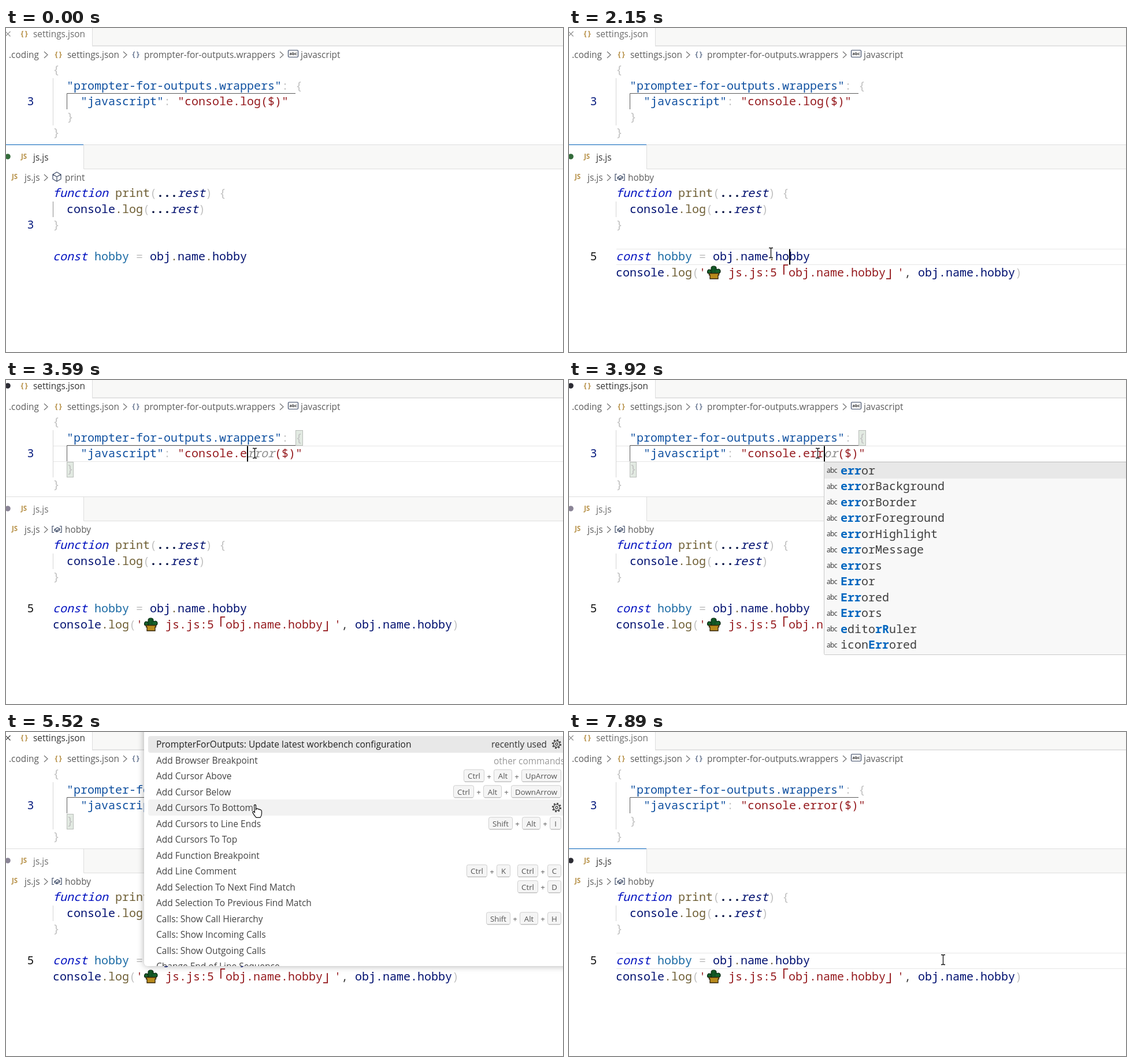
An HTML page for the animation above (8 s loop, 964 px wide and 562 px high).

```html
<!DOCTYPE html>
<html lang="en">
<head>
<meta charset="utf-8">
<title>Editor</title>
<style>
  html, body { margin: 0; width: 100%; height: 100%; overflow: hidden; background: #fff; }
  svg { display: block; }
  text { white-space: pre; }
  .code { font: 20px "Noto Sans Mono", monospace; }
  .ui { font: 15.4px "Open Sans", sans-serif; fill: #5c5c5c; }
  .js { font: bold 11.5px "Open Sans", sans-serif; fill: #b8924a; }
  .abc { font: 12px "Open Sans", sans-serif; fill: #333; }
  .cjk { font: 300 26px "Noto Sans CJK JP", "Noto Sans CJK", sans-serif; }
  .chip { font: 13.3px "Open Sans", sans-serif; fill: #555; text-anchor: middle; }
  .brace { font: bold 13px "Noto Sans Mono", monospace; }
  .b { fill: #c2c2c2; }
  .kw { fill: #0010c0; font-style: italic; }
  .var { fill: #001070; }
  .arg { fill: #001070; font-style: italic; }
  .dots { fill: #001040; font-weight: bold; }
  .con { fill: #1a6aa4; }
  .fn { fill: #6f5f35; }
  .key { fill: #0f50a0; }
  .str { fill: #951a1e; }
  .num { fill: #0b1f80; }
  .ghost { fill: #8f8f8f; font-style: italic; }
  .hit { fill: #0066bf; font-weight: bold; }
  .item { fill: #3f3f3f; }
  .line { fill: none; stroke: #e6e6e6; }
  .icon { fill: none; stroke: #3c4a66; stroke-width: 1.2; }
  .match { fill: #e2eae2; stroke: #b9bdb9; }
</style>
</head>
<body>
<svg id="stage" width="964" height="562" viewBox="0 0 964 562"></svg>
<script>
const LOOP = 8000;
const STEP = 67;
const WORD = 'error';
const CH = 12;

const text = (x, y, cls, s, more = '') => `<text x="${x}" y="${y}" class="${cls}" ${more}>${s}</text>`;
const span = (cls, s) => `<tspan class="${cls}">${s}</tspan>`;
const rect = (x, y, w, h, more) => `<rect x="${x}" y="${y}" width="${w}" height="${h}" ${more}/>`;
const path = (d, more) => `<path d="${d}" ${more}/>`;
const group = (id, ...parts) => `<g id="${id}">${parts.join('')}</g>`;
// A code row made of class, text, class, text ...
const row = (x, y, ...parts) => {
  let out = '';
  for (let i = 0; i < parts.length; i += 2) out += span(parts[i], parts[i + 1]);
  return text(x - 1, y, 'code', out);
};
const chevron = (x, y) => path(`M${x} ${y - 5}l6 5.5l-6 5.5`, 'fill="none" stroke="#707070" stroke-width="1.2"');
const braces = (x, y, more) => text(x, y, 'brace', '{', more) + text(x + 7.5, y, 'brace', '}', more);
const lineBox = y => path(`M82 ${y}.5H964M82 ${y + 27}.5H964`, 'class="line"');

const cactus =
  path('M246 426v-9q0-4 4.500-4t4.500 4v2l4-1q3 1 3 4t-3 4zM246 420l-4-1q-2.500 1-2.500 4t3 3h4z', 'fill="#14602a" stroke="#08240f" stroke-width="1.2"') +
  path('M249 415v9M252.500 415v9', 'stroke="#0a3a16"') +
  path('M242.500 425.500h17v3h-1.500v6.500h-14v-6.500h-1.500z', 'fill="#b88a1c" stroke="#33240a" stroke-width="1.3"');

function gear(y) {
  return `<g fill="none" stroke="#444" transform="translate(953 ${y})">
    <circle r="7" stroke-width="2.4" stroke-dasharray="2.75"/>
    <circle r="5.4" stroke-width="1.3"/><circle r="2" stroke-width="1.3"/></g>`;
}

const CHIP = { Ctrl: 36, Alt: 32, Shift: 42, UpArrow: 69, DownArrow: 87, I: 20 };

// Key caps, laid out from the right edge
function keys(combo, y) {
  let x = 961, out = '';
  combo.split(' ').reverse().forEach((chord, i) => {
    if (i) x -= 12;
    chord.split('+').reverse().forEach((key, j) => {
      if (j) {
        out += text(x - 8, y + 5, 'chip', '+');
        x -= 16;
      }
      const w = CHIP[key] || 24;
      x -= w;
      out += rect(x + .5, y - 11.5, w - 1, 21, 'rx="3" fill="#f5f5f5" stroke="#cfcfcf"') +
        path(`M${x + 2} ${y + 9.5}h${w - 4}`, 'stroke="#b5b5b5"') +
        text(x + w / 2, y + 4.5, 'chip', key);
    });
  });
  return out;
}

const COMMANDS = [
  ['PrompterForOutputs: Update latest workbench configuration'],
  ['Add Browser Breakpoint'],
  ['Add Cursor Above', 'Ctrl+Alt+UpArrow'],
  ['Add Cursor Below', 'Ctrl+Alt+DownArrow'],
  ['Add Cursors To Bottom'],
  ['Add Cursors to Line Ends', 'Shift+Alt+I'],
  ['Add Cursors To Top'],
  ['Add Function Breakpoint'],
  ['Add Line Comment', 'Ctrl+K Ctrl+C'],
  ['Add Selection To Next Find Match', 'Ctrl+D'],
  ['Add Selection To Previous Find Match'],
  ['Calls: Show Call Hierarchy', 'Shift+Alt+H'],
  ['Calls: Show Incoming Calls'],
  ['Calls: Show Outgoing Calls'],
  ['Change End of Line Sequence']
];

function palette() {
  const rows = COMMANDS.map(([name, combo], i) => {
    const y = 21.8 + 27.5 * i;
    return text(260, y + 5.3, 'ui', name, `style="font-size:15.5px;fill:${i ? '#444' : '#222'}"`) +
      (combo ? keys(combo, y) : '');
  });
  return rect(239, -10, 740, 416, 'rx="6" fill="#fff" style="filter:drop-shadow(0 0 6px rgba(0,0,0,.32))"') +
    '<svg x="239" y="0" width="725" height="406" viewBox="239 0 725 406">' +
    rect(246, 7, 730, 29, 'rx="4" fill="#e8e8e8"') +
    rect(246, 117, 730, 28, 'rx="4" fill="#f2f2f2"') + rows.join('') +
    text(936, 27, 'ui', 'recently used', 'text-anchor="end" style="fill:#333"') +
    text(844, 55.5, 'ui', 'other commands', 'style="fill:#999"') +
    gear(21) + gear(131) + '</svg>';
}

const WORDS = ['error', 'errorBackground', 'errorBorder', 'errorForeground', 'errorHighlight', 'errorMessage',
  'errors', 'Error', 'Errored', 'Errors', 'editorRuler', 'iconErrored', 'showErrors'];

// Marks the typed letters in a word, or returns null when they do not fit
function mark(word, typed) {
  const low = word.toLowerCase();
  const hits = new Set();
  let from = Math.max(low.indexOf(typed), 0);
  for (const c of typed) {
    const k = low.indexOf(c, from);
    if (k < 0) return null;
    hits.add(k);
    from = k + 1;
  }
  return [...word].map((c, i) => span(hits.has(i) ? 'hit' : 'item', c)).join('');
}

function suggestions(n) {
  const x = 405 + CH * n;
  const list = WORDS.map(w => mark(w, WORD.slice(0, n))).filter(Boolean).slice(0, 12);
  return rect(x + .5, 142.5, 700, 334, 'rx="2" fill="#f8f8f8" stroke="#c8c8c8"') +
    rect(x + 1, 143, 700, 28, 'fill="#e8e8e8"') +
    list.map((w, i) => text(x + 5, 161 + 27.5 * i, 'abc', 'abc', 'style="letter-spacing:-.6px"') +
      text(x + 29, 163.5 + 27.5 * i, 'code', w)).join('');
}

const stage = document.getElementById('stage');
stage.innerHTML = [
  // Upper pane
  rect(149, 0, 815, 31, 'fill="#f8f8f7"'),
  path('M149.500 0V30', 'stroke="#dedede"'),
  path('M149 31H964', 'stroke="#e2e2e2" stroke-width="2"'),
  group('close', path('M-1 6l8.500 8.500M7.500 6l-8.500 8.500', 'fill="none" stroke="currentColor" stroke-width="1.2"')),
  '<circle id="dirty" cx="3" cy="10" r="4.8" fill="#2c2c34"/>',
  braces(24, 14, 'fill="#b8924a"'),
  text(47, 16, 'ui', 'settings.json', 'id="topName"'),
  text(5, 52, 'ui', '.coding'), chevron(66, 46),
  braces(83, 50, 'fill="#b8924a"'),
  text(106, 52, 'ui', 'settings.json'), chevron(203, 46),
  braces(217, 50, 'style="font-weight:normal;fill:#2d4268"'),
  text(239, 52, 'ui', 'prompter-for-outputs.wrappers', 'id="crumb"'), chevron(474, 46),
  rect(488.5, 38.5, 17, 12, 'rx="1.500" class="icon"'),
  text(497, 47, 'abc', 'abc', 'text-anchor="middle" style="font-size:7.500px;font-weight:bold"'),
  text(510, 52, 'ui', 'javascript'),
  group('topLine', lineBox(114)),
  group('matches', rect(501.5, 87.5, 12, 26, 'class="match"'), rect(105.5, 142.5, 11, 26, 'class="match"')),
  rect(406, 114, 36, 27, 'id="selection" fill="#add6ff"'),
  path('M81.500 87V169', 'stroke="#d6d6d6"'),
  path('M105.500 141V113.500H501', 'fill="none" stroke="#5a5a5a"'),
  row(82, 78.5, 'b', '{'),
  row(106, 107, 'key', '"prompter-for-outputs.wrappers"', 'b', ': {'),
  row(37.5, 134, 'num', '3'),
  row(130, 134, 'key', '"javascript"', 'b', ': '),
  text(297, 134, 'code', '', 'id="value"'),
  row(106, 161, 'b', '}'),
  row(82, 188, 'b', '}'),

  // Lower pane
  rect(134, 203, 830, 42, 'fill="#f8f8f7"'),
  path('M0 202.500H964M134.500 203V244.500H964', 'fill="none" stroke="#dedede"'),
  path('M0 202.500H134', 'id="tabTop" stroke="#005fb8"'),
  '<circle id="dot" cx="3" cy="223" r="4.8"/>',
  text(26, 227, 'js', 'JS'), text(47, 230, 'ui', 'js.js', 'id="lowName"'),
  text(10, 262, 'js', 'JS'), text(32, 265, 'ui', 'js.js'), chevron(66, 259),
  group('inPrint',
    path('M88 250l7 4v8l-7 4l-7-4v-8zM81 254l7 4l7-4M88 258v8', 'class="icon"'),
    text(102, 265, 'ui', 'print')),
  group('inHobby',
    path('M83 253.500h-3v11h3M93 253.500h3v11h-3M84 259l5-3l4 2v2.500l-5 3l-4-2zl4 2l5-3M88 261v2', 'class="icon"'),
    text(102, 265, 'ui', 'hobby')),
  group('lowLine', lineBox(383)),
  path('M81.500 301V328', 'id="guide"'),
  row(82, 293, 'kw', 'function ', 'fn', 'print', 'b', '(', 'dots', '...', 'arg', 'rest', 'b', ') {'),
  row(106, 321, 'var', 'console', 'fn', '.log', 'b', '(', 'dots', '...', 'arg', 'rest', 'b', ')'),
  row(82, 348, 'b', '}'),
  group('num3', row(37.5, 348, 'num', '3')),
  group('num5', text(36.5, 403, 'code', '5', 'fill="#171717"')),
  row(82, 403, 'kw', 'const ', 'con', 'hobby', 'b', ' = ', 'var', 'obj', 'fn', '.', 'var', 'name', 'fn', '.', 'var', 'hobby'),
  group('log',
    row(82, 431, 'var', 'console', 'fn', '.log', 'b', '(', 'str', "'"),
    cactus,
    row(277, 431, 'str', 'js.js:5'),
    text(354, 433, 'cjk str', '「'),
    row(381, 431, 'str', 'obj.name.hobby'),
    text(548, 433, 'cjk str', '」'),
    row(569, 431, 'str', "'", 'item', ', ', 'var', 'obj.name.hobby', 'b', ')')),

  // Overlays
  rect(0, 0, 2, 27, 'id="caret" fill="#000"'),
  group('popup'),
  group('palette', palette()),
  group('beam', path('M-3.500-8.500h2.500l1 1l1-1h2.500M0-7.500V7.500M-3.500 8.500h2.500l1-1l1 1h2.500', 'fill="none" stroke="#111" stroke-width="1.3"')),
  group('hand', path('M-1 0q1.500-1.500 3 0v8l1-2q1.500-.8 2.500.8q1.500-.8 2.500.8q1.500-.6 2.500.8q1.500 0 1.500 2v4q0 4-2.500 7h-7q-3-3-6-8.500q-.5-2 1.500-2q1 .3 2 2z',
    'fill="#fff" stroke="#111" stroke-width="1.2" stroke-linejoin="round"'))
].join('');

const ui = {};
stage.querySelectorAll('[id]').forEach(el => ui[el.id] = el);
const show = (name, on) => ui[name].style.display = on ? '' : 'none';
const paint = (name, prop, value) => ui[name].style[prop] = value;

// Pointer stops: time, x, y
const POINTER = [
  [130, 753, 549], [540, 349, 390], [2150, 349, 390], [2550, 468, 54], [2640, 468, 54], [2910, 416, 128],
  [3180, 416, 128], [3330, 430, 127], [6520, 430, 127], [6800, 402, 416], [6930, 400, 405], [7340, 400, 405], [7540, 647, 395]
];
// Caret: from, to, x, y
const CARET = [
  [870, 1340, 382, 383], [1870, 2650, 382, 383], [3040, 3330, 418, 114], [3330, 3590, 442, 114],
  [3590, 3720, 418, 114], [3720, 3920, 430, 114], [3920, 4050, 442, 114], [4050, 4200, 454, 114],
  [4200, 4660, 466, 114], [5060, 5520, 466, 114], [6050, 6590, 466, 114], [7120, 7340, 466, 114],
  [7340, 7890, 406, 383]
];
const TYPED = [3590, 3720, 3920, 4050, 4200];

function pointer(t) {
  const i = POINTER.findIndex(p => p[0] > t);
  if (i < 0) return POINTER[POINTER.length - 1].slice(1);
  const [t0, x0, y0] = POINTER[i - 1], [t1, x1, y1] = POINTER[i];
  const steps = Math.max(1, Math.round((t1 - t0) / STEP));
  const p = Math.floor((t - t0) / (t1 - t0) * steps) / steps;
  const k = p * p * (3 - 2 * p);
  return [x0 + (x1 - x0) * k, y0 + (y1 - y0) * k];
}

let last = -1;
function setTyped(n) {
  if (n === last) return;
  last = n;
  ui.value.innerHTML = n
    ? span('str', '"console.' + WORD.slice(0, n)) + span('ghost', WORD.slice(n)) + span('str', '($)"')
    : span('str', '"console.log($)"');
  ui.popup.innerHTML = n > 1 ? suggestions(n) : '';
}

function draw(t) {
  const between = (a, b) => t >= a && t < b;
  const top = between(3040, 7340);
  const open = between(5520, 6050);
  const dirty = between(3590, 5190);
  const hover = between(2480, 2720);

  setTyped(TYPED.filter(s => t >= s).length);
  show('popup', between(3720, 5520));
  show('palette', open);
  show('selection', between(3330, 3590));

  show('dirty', dirty);
  show('close', !dirty);
  paint('close', 'color', top ? '#333' : '#8a8a8a');
  paint('topName', 'fill', top ? '#333' : '#6b6b6b');
  paint('lowName', 'fill', top ? '#6b6b6b' : '#333');
  paint('crumb', 'fill', hover ? '#333' : '#5c5c5c');
  paint('dot', 'fill', top ? '#8a8496' : t < 3040 ? '#336b3a' : '#2c2c34');
  show('tabTop', !top);

  show('topLine', top && !open);
  show('matches', top);
  show('lowLine', t >= 870 && !top);
  show('num3', t < 870);
  show('num5', t >= 870);
  show('inPrint', t < 1010);
  show('inHobby', t >= 1010);
  paint('guide', 'stroke', t < 870 ? '#8c8c8c' : '#d6d6d6');
  show('log', t >= 1740);

  const caret = CARET.find(c => between(c[0], c[1]));
  show('caret', caret);
  if (caret) ui.caret.setAttribute('transform', `translate(${caret[2] - 1} ${caret[3] + .5})`);

  const seen = t >= POINTER[0][0];
  const [x, y] = seen ? pointer(t) : [0, 0];
  const hand = open || hover;
  show('beam', seen && !hand);
  show('hand', seen && hand);
  const at = `translate(${Math.round(x) + .5} ${Math.round(y)})`;
  ui.beam.setAttribute('transform', at);
  ui.hand.setAttribute('transform', at);
}

const start = performance.now();
function tick() {
  draw((performance.now() - start) % LOOP);
  requestAnimationFrame(tick);
}
tick();
</script>
</body>
</html>
```
